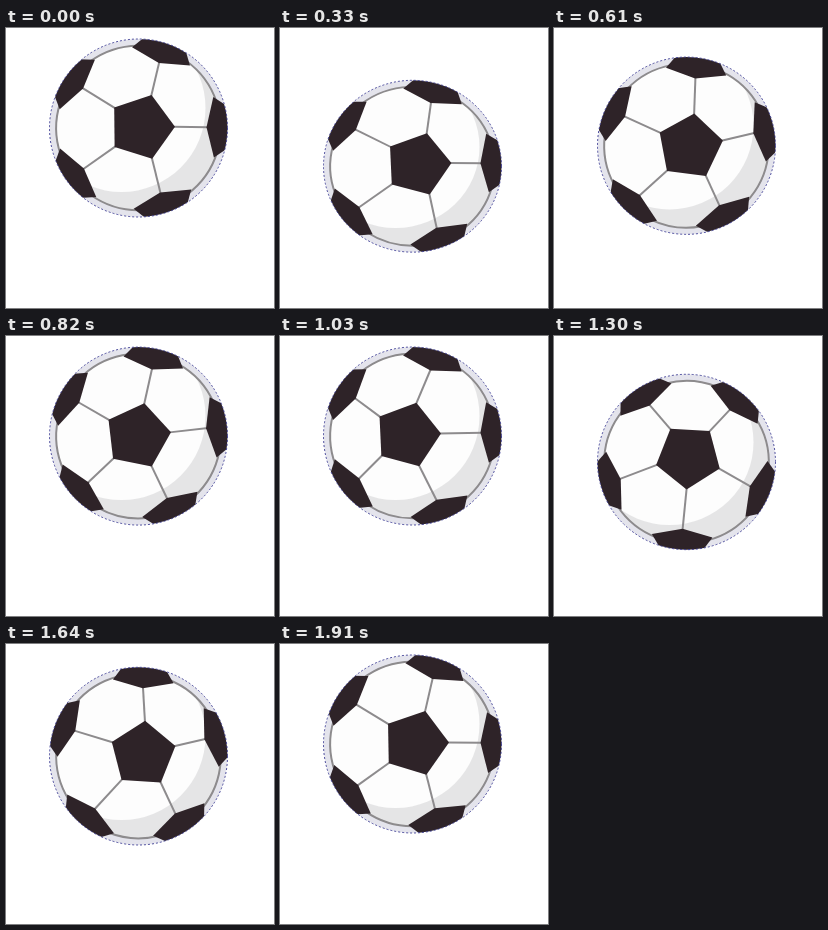
Write an HTML page with a canvas that moves like this. It is 268 by 280 pixels and loops after 1.94 s.

```html
<!DOCTYPE html>
<html lang="en">
<head>
<meta charset="utf-8">
<title>Bouncing ball</title>
<style>
  html, body { margin: 0; width: 268px; height: 280px; overflow: hidden; background: #fff; }
  canvas { display: block; }
</style>
</head>
<body>
<canvas id="stage" width="268" height="280"></canvas>
<script>
const ctx = document.getElementById('stage').getContext('2d');
const TAU = Math.PI * 2, RAD = Math.PI / 180;
const LOOP = 1940, PERIOD = 1010, FALL = 490;
const DROP = 124, SQUASH = 0.46;
const CX = 132.5, TOP = 100, R = 89, RING = 82.3;
const DARK = '#2e2328', SEAM = '#8d8b8d', RIM = '#e4e4ec', SHADE = '#e5e5e6';

// time, spin in degrees, offset of the middle patch
const spin = [
  [0, 0, 3, -1], [330, 142, 5.5, -2], [610, 278, 3.5, 1], [1030, 430, -5, -1],
  [1300, 526, 2, -5.5], [1450, 574, 5.5, -2.5], [1910, 720, 3, -1], [LOOP, 720, 3, -1]
];

function spinAt(t) {
  let i = 1;
  while (i < spin.length - 1 && spin[i][0] <= t) i++;
  const a = spin[i - 1], b = spin[i], k = (t - a[0]) / (b[0] - a[0]);
  return a.map((v, j) => v + (b[j] - v) * k);
}

// Accelerating fall with late squash, then a quick rise that eases out
function bounceAt(t) {
  const p = t % PERIOD;
  if (p < FALL) {
    const u = p / FALL;
    return { dy: DROP * u ** 3, scale: 1 - SQUASH * u ** 6.6 };
  }
  const v = 1 - (p - FALL) / (PERIOD - FALL);
  return { dy: DROP * v ** 7.35, scale: 1 - SQUASH * v ** 18 };
}

const polar = (r, deg, x = 0, y = 0) => [x + r * Math.cos(deg * RAD), y + r * Math.sin(deg * RAD)];

function disc(x, y, r) {
  ctx.beginPath();
  ctx.arc(x, y, r, 0, TAU);
}

function poly(points, color) {
  ctx.beginPath();
  points.forEach(p => ctx.lineTo(p[0], p[1]));
  ctx.closePath();
  ctx.fillStyle = color;
  ctx.fill();
}

// The middle patch is off centre; the outer patches stay on the ring
function pattern(angle, ox, oy) {
  const dirs = [0, 1, 2, 3, 4].map(i => angle + i * 72);
  ctx.strokeStyle = SEAM;
  ctx.lineWidth = 2;
  for (const a of dirs) {
    ctx.beginPath();
    ctx.moveTo(...polar(32, a, ox, oy));
    ctx.lineTo(...polar(70, a));
    ctx.stroke();
    ctx.beginPath();
    ctx.arc(0, 0, RING, (a + 18) * RAD, (a + 54) * RAD);
    ctx.stroke();
  }
  for (const a of dirs) {
    poly([polar(68, a), polar(81, a + 22), polar(92, a + 13), polar(100, a),
          polar(92, a - 13), polar(81, a - 22)], DARK);
  }
  poly(dirs.map(a => polar(33.5, a, ox, oy)), DARK);
}

function draw(t) {
  const { dy, scale } = bounceAt(t);
  const [, angle, ox, oy] = spinAt(t);
  ctx.fillStyle = '#fff';
  ctx.fillRect(0, 0, 268, 280);
  ctx.save();
  ctx.translate(CX, TOP + dy);
  ctx.scale(1, scale);

  ctx.save();
  disc(0, 0, R);
  ctx.fillStyle = RIM;
  ctx.fill();
  ctx.clip();

  ctx.save();
  disc(0, 0, RING);
  ctx.clip();
  ctx.fillStyle = SHADE;
  ctx.fillRect(-R, -R, 2 * R, 2 * R);
  disc(-17, -20, 84);
  ctx.fillStyle = '#fdfdfd';
  ctx.fill();
  ctx.restore();

  pattern(angle - 1, ox, oy);
  ctx.restore();

  // broken dark blue outline
  disc(0, 0, R);
  ctx.setLineDash([2, 2]);
  ctx.lineWidth = 0.9;
  ctx.strokeStyle = '#3c3c94';
  ctx.stroke();
  ctx.restore();
}

const start = performance.now();
function frame() {
  draw((performance.now() - start) % LOOP);
  requestAnimationFrame(frame);
}
frame();
</script>
</body>
</html>
```
